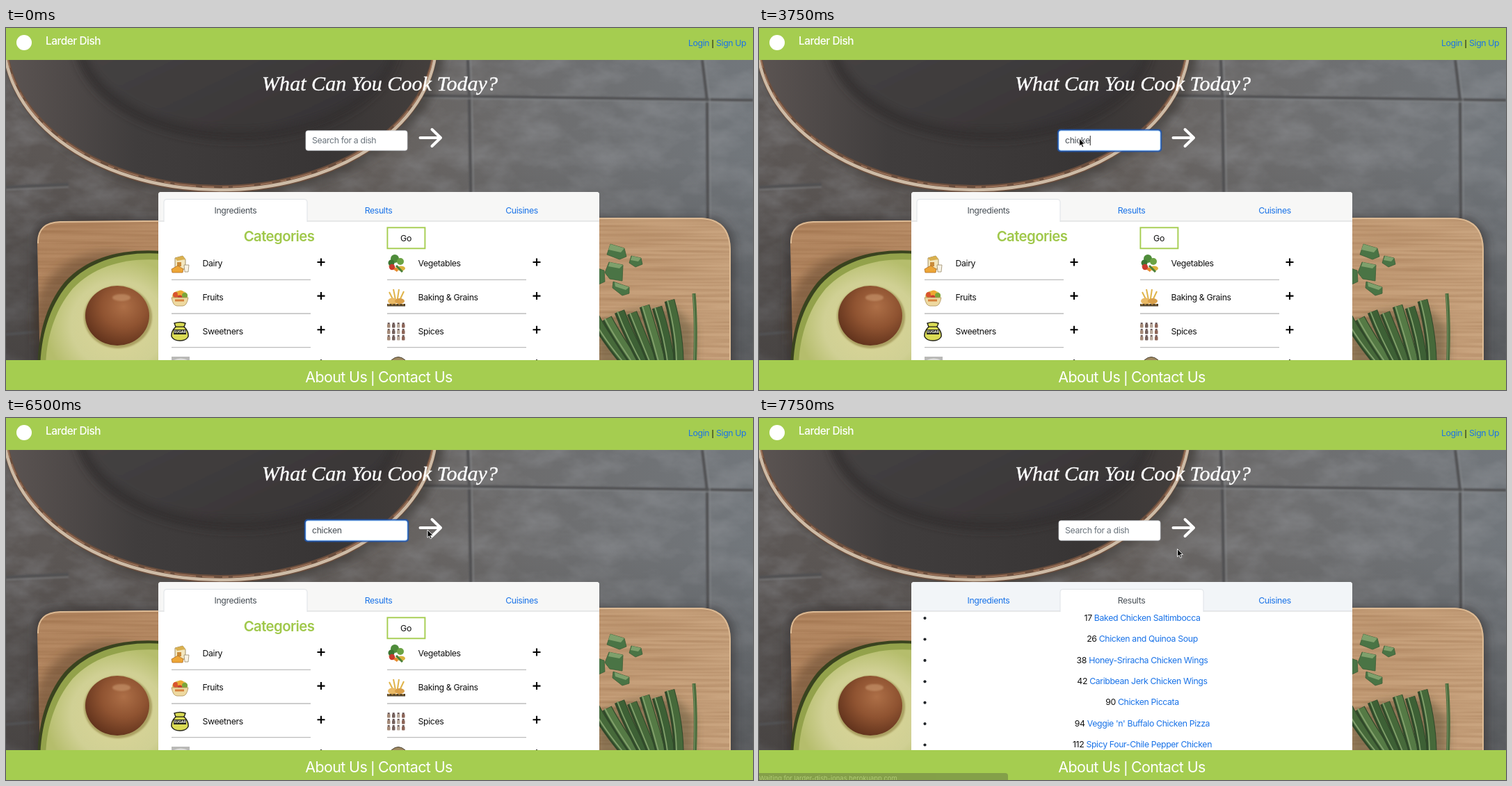
An HTML page for the animation above (8000 ms loop, 1074 px wide and 521 px high).

```html
<!DOCTYPE html>
<html lang="en">
<head>
<meta charset="utf-8">
<title>Recipe search</title>
<style>
  html, body { margin: 0; width: 100%; height: 100%; overflow: hidden; background: #6c6c6d; }
  svg { position: absolute; left: 0; top: 0; width: 100vw; height: 100vh; display: block; }
  #photo { will-change: transform; }
  text { font: 12.3px Inter, Roboto, sans-serif; letter-spacing: -.03em; fill: #111; white-space: pre; }
  .mid { text-anchor: middle; }
  .link { fill: #1a73e8; }
  .tab { fill: #495057; }
  .brand { font-size: 15.4px; font-weight: 500; fill: #fff; }
  .title { font: italic 30.1px "Liberation Serif", "Noto Serif", serif; letter-spacing: 0; fill: #fff; stroke: #fff; stroke-width: .35; }
  .head { font-size: 20.4px; font-weight: 600; fill: #a0c84b; }
  .foot { font-size: 21.5px; fill: #fff; }
  .pipe { font-family: "Liberation Sans", Arial, sans-serif; }
  .status { font-size: 9.4px; letter-spacing: 0; fill: #c9c7c8; }
  .sugar { font-size: 5px; font-weight: 700; letter-spacing: 0; fill: #fff; }
  .hint { fill: #6c757d; }
  .plus { stroke: #000; stroke-width: 2.1; }
  .rule { stroke: #bdbdbd; stroke-width: 1.3; }
</style>
</head>
<body>
<svg id="photo" viewBox="0 0 1074 521" preserveAspectRatio="none">
  <defs>
    <linearGradient id="slate">
      <stop offset="0" stop-color="#5b5654"/><stop offset=".5" stop-color="#65605d"/>
      <stop offset=".7" stop-color="#6d6d6e"/><stop offset="1" stop-color="#72777c"/>
    </linearGradient>
    <linearGradient id="dusk" x2="0" y2="1">
      <stop offset=".35" stop-color="#2a2828" stop-opacity="0"/><stop offset="1" stop-color="#2a2828" stop-opacity=".45"/>
    </linearGradient>
    <linearGradient id="wall">
      <stop offset="0" stop-color="#5b5452"/><stop offset=".3" stop-color="#403d3d"/>
      <stop offset=".75" stop-color="#383535"/><stop offset="1" stop-color="#443f3d"/>
    </linearGradient>
    <linearGradient id="floor" x2=".8" y2="1">
      <stop offset="0" stop-color="#4d4a4a"/><stop offset="1" stop-color="#373435"/>
    </linearGradient>
    <linearGradient id="wood">
      <stop offset="0" stop-color="#b48862"/><stop offset=".5" stop-color="#bd936c"/><stop offset="1" stop-color="#c9a47f"/>
    </linearGradient>
    <radialGradient id="flesh" cx=".62" cy=".6" r=".62">
      <stop offset="0" stop-color="#dcd699"/><stop offset=".65" stop-color="#d0d094"/><stop offset="1" stop-color="#b5bd6c"/>
    </radialGradient>
    <radialGradient id="pit" cx=".6" cy=".35" r=".7">
      <stop offset="0" stop-color="#ad6f47"/><stop offset=".5" stop-color="#8f5331"/><stop offset="1" stop-color="#5f311b"/>
    </radialGradient>
    <filter id="mottle" x="0" y="0" width="1" height="1" color-interpolation-filters="sRGB">
      <feTurbulence type="fractalNoise" baseFrequency=".018 .03" numOctaves="4" seed="7"/>
      <feColorMatrix values="0 0 0 0 .62  0 0 0 0 .63  0 0 0 0 .65  .7 0 0 0 -.25"/>
    </filter>
    <filter id="grain" x="0" y="0" width="1" height="1" color-interpolation-filters="sRGB">
      <feTurbulence type="fractalNoise" baseFrequency=".006 .25" numOctaves="2" seed="3"/>
      <feColorMatrix values="0 0 0 0 .52  0 0 0 0 .34  0 0 0 0 .2  .6 0 0 0 -.2"/>
    </filter>
    <filter id="soft" x="-20%" y="-20%" width="140%" height="140%"><feGaussianBlur stdDeviation="7"/></filter>
    <filter id="blur1"><feGaussianBlur stdDeviation=".9"/></filter>
    <clipPath id="boardClip"><use href="#board"/></clipPath>
  </defs>

  <rect width="1074" height="521" fill="url(#slate)"/>
  <rect width="1074" height="521" filter="url(#mottle)"/>
  <rect width="1074" height="521" fill="url(#dusk)"/>
  <g fill="none" filter="url(#blur1)">
    <path d="M560 97 1074 104M664 46 666 100 669 290M1001 46 1008 104 1009 290M0 229 90 225M0 441 60 436" stroke="#515153" stroke-width="4"/>
    <path d="M560 100 1074 107M668 46 670 100 673 290M1005 46 1012 104 1013 290M0 233 90 229" stroke="#85888b" stroke-width="1.2"/>
  </g>

  <ellipse cx="316" cy="26" rx="316" ry="217" fill="#2d2928" opacity=".5" filter="url(#soft)"/>
  <ellipse cx="308" cy="20" rx="313" ry="217" fill="#6b4e3d"/>
  <ellipse cx="308" cy="19" rx="310.500" ry="214" fill="none" stroke="#cdbba6" stroke-width="4.500"/>
  <ellipse cx="308" cy="18" rx="308" ry="211" fill="none" stroke="#9a7158" stroke-width="2" stroke-dasharray="17 9 31 6 9 12"/>
  <ellipse cx="308" cy="16" rx="306" ry="210" fill="url(#wall)"/>
  <ellipse cx="332" cy="18" rx="232" ry="143" fill="#302d2d" filter="url(#soft)"/>
  <ellipse cx="335" cy="12" rx="226" ry="137" fill="url(#floor)" filter="url(#soft)"/>

  <path d="M40 300Q42 272 82 273H1008Q1046 275 1047 320V490H42Z" fill="#2c2826" opacity=".5" filter="url(#soft)"/>
  <path id="board" d="M45 310Q44 279 78 278L200 277 870 273H1000Q1041 275 1042 318V490H49Z" fill="url(#wood)"/>
  <g clip-path="url(#boardClip)">
    <rect x="40" y="270" width="1010" height="220" filter="url(#grain)"/>
    <path d="M46 310Q45 280 78 279L200 278 870 274H1000Q1040 276 1041 318V490" fill="none" stroke="#dcba94" stroke-width="2"/>
  </g>

  <ellipse cx="148" cy="420" rx="108" ry="98" fill="#4c3520" opacity=".4" filter="url(#soft)"/>
  <path d="M45 490C46 444 56 400 84 366 118 328 170 317 225 321V490Z" fill="#39431f"/>
  <path d="M49 490C50 446 61 402 89 369 122 333 172 321 225 325V490Z" fill="#93a24b"/>
  <path d="M57 490C57 450 69 407 96 375 128 341 175 330 225 334V490Z" fill="url(#flesh)"/>
  <ellipse cx="161" cy="416" rx="49" ry="45" fill="#aaa062" filter="url(#blur1)"/>
  <ellipse cx="160" cy="414" rx="46" ry="43" fill="url(#pit)"/>
  <ellipse cx="166" cy="388" rx="13" ry="5" fill="#c9976e" opacity=".6" filter="url(#blur1)"/>

  <g fill="#4a7445" stroke="#3a5d37" stroke-width=".8">
    <path d="M869 311 889 317 892 329 882 333 864 326Z"/>
    <path d="M899 328 913 331 915 340 905 344 896 338Z"/>
    <path d="M867 337 887 341 886 364 868 361 861 352Z"/>
    <path d="M873 365 896 373 896 382 886 385 872 374Z"/>
    <path d="M848 345 860 349 861 365 848 371Z"/>
  </g>
  <g fill="#7fa06c">
    <path d="M869 311 889 317 884 323 866 319Z"/><path d="M900 328 913 331 909 336 898 334Z"/>
    <path d="M868 337 887 341 882 346 866 343Z"/><path d="M875 366 896 373 891 377 876 372Z"/>
  </g>
  <path d="M848 425 900 408 960 402 990 430V490H848Z" fill="#3a3a22" opacity=".4" filter="url(#soft)"/>
  <g id="stalks" fill="none"></g>
  <path d="M989 382Q993 428 990 490" fill="none" stroke="#4c6c3d" stroke-width="5"/>
  <path d="M988 383Q992 428 989 490" fill="none" stroke="#789666" stroke-width="1"/>
</svg>

<svg viewBox="0 0 1074 521" preserveAspectRatio="none">
  <rect width="1074" height="46" fill="#a5cd50"/>
  <circle cx="26" cy="21" r="11" fill="#fff"/>
  <text class="brand" x="57" y="24">Larder Dish</text>
  <text class="link" x="981" y="26">Login</text>
  <text class="pipe" x="1014.500" y="25.500">|</text>
  <text class="link" x="1021" y="26">Sign Up</text>
  <text class="title mid" x="537.5" y="90">What Can You Cook Today?</text>

  <rect id="ring" x="428.8" y="145.6" width="150.4" height="32.8" rx="4.5" fill="#1d57b5" opacity=".8"/>
  <rect id="field" x="431" y="147.8" width="146" height="28.4" rx="3" fill="#fff" stroke="#ced4da" stroke-width=".8"/>
  <text id="query" x="440" y="166"></text>
  <rect id="caret" y="155" width="1" height="14" fill="#222"/>
  <path d="M595.5 158H624M612.5 146 625 158 612.5 170" fill="none" stroke="#fff" stroke-width="4" stroke-linecap="round" stroke-linejoin="round"/>
  <g id="press" fill="none">
    <rect x="583.6" y="121.6" width="52.8" height="71.8" rx="3" stroke="#fff" stroke-width="1.2"/>
    <rect x="585" y="123" width="50" height="69" rx="2" stroke="#1b5fc9" stroke-width="1.8"/>
  </g>

  <path d="M219 478V240Q219 236 223 236H849Q853 236 853 240V478Z" fill="#fff"/>
  <path id="bar" d="M219 278V240Q219 236 223 236H849Q853 236 853 240V278Z"/>
  <path d="M219 278H853" stroke="#d3d5d6"/>
  <path id="active" d="M0 279V250Q0 246.500 4 246.500H202Q206 246.500 206 250V279" fill="#fff" stroke="#dee2e6"/>
  <text class="mid" id="tab0" x="330" y="266.500">Ingredients</text>
  <text class="mid" id="tab1" x="535.500" y="266.500">Results</text>
  <text class="mid link" x="741.500" y="266.500">Cuisines</text>

  <g id="ingredients">
    <text class="head mid" x="392.500" y="307">Categories</text>
    <rect x="548.400" y="287.300" width="54" height="30" fill="#fff" stroke="#a5cd50" stroke-width="1.900"/>
    <text class="mid" x="575" y="307">Go</text>
    <g id="rows"></g>

    <g transform="translate(250 339)">
      <path d="M-7-8 4-11 8-6V8H-7Z" fill="#f3e6bd" stroke="#8d7648" stroke-width=".8"/>
      <path d="M-7-8 4-11 8-6-4-4Z" fill="#d9b04e"/>
      <path d="M-4-2H2V4H-4Z" fill="#c98b3a"/>
      <path d="M-12 8-3 3 5 8 4 13H-11Z" fill="#eda637" stroke="#a8641b" stroke-width=".7"/>
      <path d="M6 2H13L12 12H7Z" fill="#f7f2e4" stroke="#9b8b6b" stroke-width=".8"/>
    </g>
    <g transform="translate(250 388)">
      <ellipse cy="-2" rx="11" ry="8" fill="#d7c55b"/>
      <circle cx="-6" cy="-4" r="4" fill="#d9542f"/><circle cx="1" cy="-6" r="4.500" fill="#eda832"/>
      <circle cx="7" cy="-3" r="4" fill="#7ba53a"/><circle cx="0" cy="0" r="3.500" fill="#c93a31"/>
      <path d="M-12 0H12Q10 12 4 12H-4Q-10 12-12 0Z" fill="#eed9a0" stroke="#ad925a" stroke-width=".8"/>
      <path d="M-7 4H6" stroke="#d5803c" stroke-width="3"/>
    </g>
    <g transform="translate(250 437)">
      <path d="M-8-12Q0-15 8-12L6-7Q13 0 12 7 9 13 0 13T-12 7Q-13 0-6-7Z" fill="#dbdc55" stroke="#25251a" stroke-width="1.500"/>
      <path d="M-6-7H6" stroke="#25251a" stroke-width="1.300"/>
      <rect x="-9" y="-3" width="18" height="7" fill="#25251a"/>
      <text class="sugar mid" y="2.400">SUGAR</text>
    </g>
    <g transform="translate(561 339)">
      <circle cx="-2" cy="-7" r="6" fill="#4e8c3a"/><circle cx="6" cy="-3" r="5" fill="#6ba344"/><circle cx="-7" cy="-1" r="4.500" fill="#3c7632"/>
      <path d="M-12 3 5 7 1 12Z" fill="#e7892f"/><circle cx="-6" cy="5" r="4.200" fill="#c93a2d"/>
      <ellipse cx="7" cy="7" rx="6" ry="3.500" fill="#d9b33d"/><path d="M0 3 9 12" stroke="#4b8038" stroke-width="3"/>
    </g>
    <g transform="translate(561 388)">
      <path d="M-10-8-2 8M-4-12 0 8M4-12 1 8M11-9 3 8" stroke="#dfb44a" stroke-width="2"/>
      <ellipse cx="-5" cy="5" rx="7" ry="4.500" fill="#e9b965"/><ellipse cx="5" cy="5" rx="7" ry="4" fill="#d99f49"/>
      <path d="M-13 9H13V12.500H-13Z" fill="#4b3c27"/><path d="M-12 10H12" stroke="#dca846" stroke-dasharray="3 2"/>
    </g>
    <g id="jars" transform="translate(561 437)"></g>
    <path d="M238 473H264V478H238Z" fill="#b9b9b7"/><path d="M241 478Q251 473 261 478" fill="#dededb"/>
    <path d="M554 478Q564 469 574 478" fill="#9f8960" stroke="#4b4334"/>
  </g>
  <g id="results"></g>

  <rect y="478" width="1074" height="43" fill="#a5cd50"/>
  <text class="foot mid" x="536" y="510">About Us <tspan class="pipe">|</tspan> Contact Us</text>
  <g id="status">
    <path d="M0 511H354Q358 511 358 515V521H0Z" fill="#3b393b"/>
    <text class="status" x="0" y="521.500">Waiting for larder-dish-jonas.herokuapp.com...</text>
  </g>
  <path id="cursor" d="M0 0V11.200L2.600 8.800 4.300 12.800 6.200 12 4.500 8.100H8Z" fill="#000" stroke="#fff" stroke-width=".9"/>
</svg>

<script>
const $ = id => document.getElementById(id);
const show = (id, on) => $(id).style.display = on ? '' : 'none';

// spring onion stalks lean right less and less along the board
$('stalks').innerHTML = Array.from({ length: 7 }, (_, i) => {
  const x = 846 + i * 18, top = 416 - i * 4 + i % 2 * 6, foot = x + 52 - i * 6.5;
  const stem = (dx, color, w) =>
    `<path d="M${x + dx} ${top}Q${x + 14 + dx} 445 ${foot + dx} 490" stroke="${color}" stroke-width="${w}"/>`;
  return stem(0, '#30492a', 15) + stem(1, ['#46693a', '#557a45', '#3d6035'][i % 3], 11) + stem(-3, '#82a06c', 1.8);
}).join('');

const names = [['Dairy', 'Fruits', 'Sweetners', ''], ['Vegetables', 'Baking & Grains', 'Spices', '']];
$('rows').innerHTML = names.map((col, c) => col.map((name, r) => {
  const x = 238 + c * 310, y = 339 + r * 48.6;
  const plus = `<path class="plus" d="M${x + 209.500} ${y - 2}h11m-5.500-5.500v11"/>`;
  return plus + (name && `<text x="${x + 44.5}" y="${y + 4.3}">${name.replace('&', '&amp;')}</text>` +
    `<path class="rule" d="M${x} ${y + 23.4}h200"/>`);
}).join('')).join('');

$('jars').innerHTML = Array.from({ length: 12 }, (_, i) => {
  const x = i % 4 * 7 - 13, y = Math.floor(i / 4) * 9 - 13;
  return `<rect x="${x}" y="${y + 2}" width="4.500" height="5.500" rx="1" fill="${['#a58a78', '#8d6558', '#b9a99c', '#75615c'][i * 3 % 4]}"/>` +
    `<rect x="${x + .7}" y="${y}" width="3" height="2" fill="#6b5a5a"/>`;
}).join('');

const dishes = ['17 Baked Chicken Saltimbocca', '26 Chicken and Quinoa Soup', '38 Honey-Sriracha Chicken Wings',
  '42 Caribbean Jerk Chicken Wings', '90 Chicken Piccata', "94 Veggie 'n' Buffalo Chicken Pizza",
  '112 Spicy Four-Chile Pepper Chicken'];
$('results').innerHTML = dishes.map((dish, i) => {
  const y = 287.5 + i * 30.4, [num, ...rest] = dish.split(' ');
  return `<circle cx="238.500" cy="${y + .6}" r="2.100" fill="#212529"/>` +
    `<text class="mid" x="551" y="${y + 4.3}">${num} <tspan class="link">${rest.join(' ')}</tspan></text>`;
}).join('');

const start = { at: null, text: '', caret: 0, focus: 0, press: 0, results: 0, status: 0 };
const steps = [
  [250, { at: [502, 84] }], [500, { at: [484, 116] }], [750, { at: [467, 148] }], [1000, { at: [460.5, 159] }],
  [1250, { focus: 1, caret: 1 }], [1750, { caret: 0 }],
  [2250, { text: 'c', caret: 1 }], [2500, { text: 'ch' }],
  ...['chi', 'chic', 'chick', 'chicke', 'chicken'].map((text, i) => [3000 + i * 250, { text }]),
  [4500, { caret: 0 }], [5000, { caret: 1, at: [464, 162] }], [5250, { at: [482, 172] }],
  [5500, { caret: 0, at: [523, 177] }], [5750, { at: [572, 171] }], [6000, { caret: 1, at: [602, 163] }],
  [6250, { at: [606, 161] }], [6500, { caret: 0 }], [6750, { focus: 0, press: 1 }],
  [7000, { status: .5 }], [7250, { status: 1 }],
  [7500, { text: '', press: 0, results: 1 }], [7750, { at: [601.5, 188.5], status: .3 }]
];

function draw(s) {
  const query = $('query');
  query.textContent = s.text || 'Search for a dish';
  query.setAttribute('class', s.text ? 'tab' : 'hint');
  $('caret').setAttribute('x', 440 + (s.text ? query.getComputedTextLength() : 0));
  show('caret', s.caret);
  show('ring', s.focus);
  $('field').setAttribute('stroke', s.focus ? '#80bdff' : '#ced4da');
  show('press', s.press);
  show('ingredients', !s.results);
  show('results', s.results);
  $('bar').setAttribute('fill', s.results ? '#f2f5f8' : '#f7f7f6');
  $('active').setAttribute('transform', `translate(${s.results ? 433 : 227} 0)`);
  $('tab0').setAttribute('class', s.results ? 'mid link' : 'mid tab');
  $('tab1').setAttribute('class', s.results ? 'mid tab' : 'mid link');
  $('status').style.opacity = s.status;
  show('cursor', s.at);
  if (s.at) $('cursor').setAttribute('transform', `translate(${s.at})`);
}

const t0 = performance.now();
let last = -1;
function tick() {
  const t = (performance.now() - t0) % 8000;
  const done = steps.filter(([time]) => time <= t);
  if (done.length !== last) {
    last = done.length;
    draw(Object.assign({}, start, ...done.map(([, change]) => change)));
  }
  requestAnimationFrame(tick);
}
tick();
</script>
</body>
</html>
```
